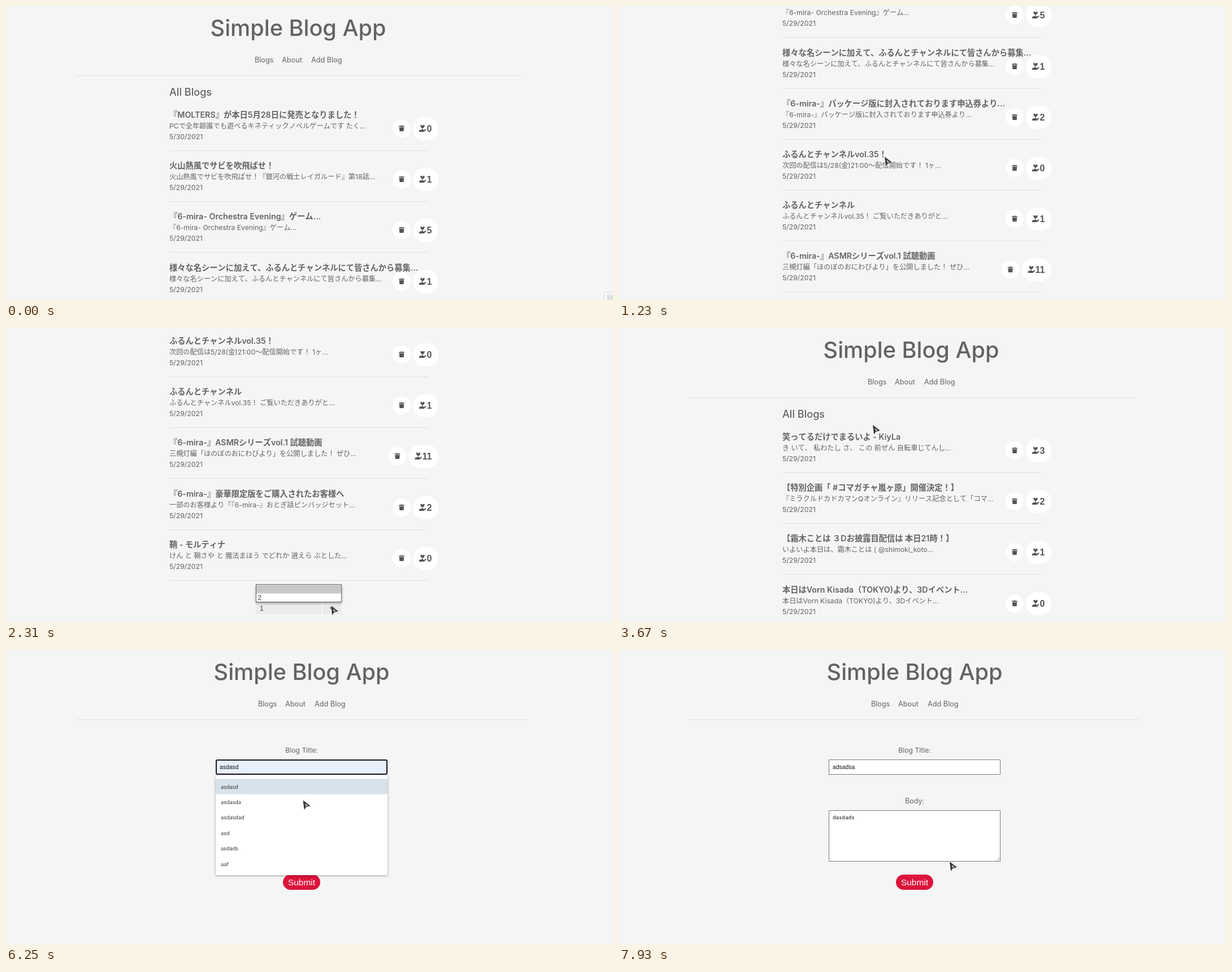
An HTML page with a canvas for the animation above (7990 ms loop, 1074x521 px).

```html
<!DOCTYPE html>
<html lang="ja">
<head>
<meta charset="utf-8">
<title>Simple Blog App</title>
<style>
html, body { margin: 0; width: 100%; height: 100%; overflow: hidden; background: #f5f5f5; }
canvas { display: block; width: 1074px; height: 521px; }
</style>
</head>
<body>
<canvas id="stage"></canvas>
<script>
const W = 1074, H = 521, LOOP = 7990, PITCH = 90.2;
const SANS = 'Inter, "Noto Sans CJK JP", "Noto Sans CJK", sans-serif';
const ARIAL = '"Liberation Sans", Arial, sans-serif';
const UI = '"Open Sans", "Noto Sans", sans-serif';
const MONO = '"DejaVu Sans Mono", monospace';
const INK = '#636363';

const canvas = document.getElementById('stage');
const dpr = window.devicePixelRatio || 1;
canvas.width = W * dpr;
canvas.height = H * dpr;
const c = canvas.getContext('2d');

// title, summary, likes
const PAGE1 = [
  ['『MOLTERS』が本日5月28日に発売となりました！', 'PCで全年齢誰でも遊べるキネティックノベルゲームです たく...', 0],
  ['火山熱風でサビを吹飛ばせ！', '火山熱風でサビを吹飛ばせ！『銀河の戦士レイガルード』第18話...', 1],
  ['『6-mira- Orchestra Evening』ゲーム...', '『6-mira- Orchestra Evening』ゲーム...', 5],
  ['様々な名シーンに加えて、ふるんとチャンネルにて皆さんから募集...', '様々な名シーンに加えて、ふるんとチャンネルにて皆さんから募集...', 1],
  ['『6-mira-』パッケージ版に封入されております申込券より...', '『6-mira-』パッケージ版に封入されております申込券より...', 2],
  ['ふるんとチャンネルvol.35！', '次回の配信は5/28(金)21:00～配信開始です！ 1ヶ...', 0],
  ['ふるんとチャンネル', 'ふるんとチャンネルvol.35！ ご覧いただきありがと...', 1],
  ['『6-mira-』ASMRシリーズvol.1 試聴動画', '三槻灯編「ほのぼのおにわびより」を公開しました！ ぜひ...', 11],
  ['『6-mira-』豪華限定版をご購入されたお客様へ', '一部のお客様より「『6-mira-』おとぎ話ピンバッジセット...', 2],
  ['鞘 - モルティナ', 'けん と 鞘さや と 魔法まほう でどれか 選えら ぶとした...', 0]
];
const PAGE2 = [
  ['笑ってるだけでまるいよ - KiyLa', 'き いて、 私わたし さ、 この 前ぜん 自転車じてんし...', 3],
  ['【特別企画「 #コマガチャ嵐ヶ原」開催決定！】', '『ミラクルドカドカマンQオンライン』リリース記念として「コマ...', 2],
  ['【霜木ことは ３Dお披露目配信は 本日21時！】', 'いよいよ本日は、霜木ことは ( @shimoki_koto...', 1],
  ['本日はVorn Kisada（TOKYO)より、3Dイベント...', '本日はVorn Kisada（TOKYO)より、3Dイベント...', 0]
];
const HINTS = ['asdasd', 'asdasda', 'asdasdad', 'asd', 'asdads', 'aaf'];

// time, x, y of the pointer tip
const POINTER = [
  [70, 1062, 508], [330, 840, 410], [600, 560, 300], [810, 470, 267],
  [1400, 470, 267], [1620, 472, 284], [1900, 530, 420], [2150, 575, 492],
  [2400, 575, 492], [2750, 500, 480], [3000, 470, 478], [3250, 468, 478],
  [3400, 462, 400], [3670, 449, 172], [3900, 450, 120], [4130, 455, 96],
  [4400, 468, 96], [4700, 530, 100], [4930, 578, 98], [5200, 556, 140],
  [5400, 542, 162], [5570, 542, 159], [5680, 566, 95], [5780, 590, 190],
  [5950, 590, 206], [6080, 560, 222], [6250, 525, 266], [6400, 600, 300],
  [6580, 708, 310], [6850, 872, 350], [7050, 872, 350], [7380, 560, 330],
  [7550, 566, 350], [7720, 574, 404], [7930, 585, 375]
];
const SCROLL = [[870, 0], [1040, 160], [1230, 380], [1420, 545], [1600, 621]];

// Smooth interpolation between keys, one value per column
function track(keys, t) {
  if (t <= keys[0][0]) return keys[0].slice(1);
  const i = keys.findIndex(k => k[0] > t);
  if (i < 0) return keys[keys.length - 1].slice(1);
  const a = keys[i - 1], b = keys[i];
  const u = (t - a[0]) / (b[0] - a[0]);
  return a.slice(1).map((v, n) => v + (b[n + 1] - v) * u);
}

function text(str, x, y, size, { weight = 400, family = SANS, color = INK, align = 'left' } = {}) {
  c.font = `${weight} ${size}px ${family}`;
  c.fillStyle = color;
  c.textAlign = align;
  c.fillText(str, x, y);
}

function box(x, y, w, h, color) {
  c.fillStyle = color;
  c.fillRect(x, y, w, h);
}

function pill(x, y, w, h, r, color) {
  c.fillStyle = color;
  c.beginPath();
  c.roundRect(x, y, w, h, r);
  c.fill();
}

function shape(points, color) {
  c.fillStyle = color;
  c.beginPath();
  points.forEach(([x, y]) => c.lineTo(x, y));
  c.closePath();
  c.fill();
}

function shadowed(blur, dy, draw) {
  c.save();
  c.shadowColor = 'rgba(0,0,0,.35)';
  c.shadowBlur = blur * dpr;
  c.shadowOffsetY = dy * dpr;
  draw();
  c.restore();
}

function trash(x, y) {
  const ink = '#555';
  pill(x - 5, y - 4.5, 10, 1.5, 0.5, ink);
  box(x - 1.8, y - 5.3, 3.6, 1.2, ink);
  shape([[x - 4.2, y - 2.3], [x + 4.2, y - 2.3], [x + 3.6, y + 5], [x - 3.6, y + 5]], ink);
}

function heartHand(x, y) {
  c.fillStyle = '#555';
  c.beginPath();
  c.moveTo(x, y);
  c.bezierCurveTo(x - 7, y - 5, x - 2.5, y - 9, x, y - 5);
  c.bezierCurveTo(x + 2.5, y - 9, x + 7, y - 5, x, y);
  c.fill();
  c.beginPath();
  c.moveTo(x - 6, y + 2.6);
  c.lineTo(x - 4, y + 2.4);
  c.quadraticCurveTo(x - 2, y + 0.4, x + 1.6, y + 1);
  c.quadraticCurveTo(x + 2.4, y + 2, x + 0.6, y + 2.6);
  c.lineTo(x + 2.5, y + 2.6);
  c.lineTo(x + 5.4, y + 0.6);
  c.quadraticCurveTo(x + 7.4, y + 1, x + 5.8, y + 2.6);
  c.lineTo(x + 2.6, y + 5.6);
  c.lineTo(x - 6, y + 5.6);
  c.fill();
}

function header(mid, left, right) {
  text('Simple Blog App', mid, 53, 39.6, { weight: 500, align: 'center' });
  text('Blogs', mid - 77, 99.5, 12.7);
  text('About', mid - 29, 99.5, 12.7);
  text('Add Blog', mid + 23, 99.5, 12.7);
  box(left, 123, right - left, 1, '#e0e0e0');
}

function entry([title, summary, likes], i) {
  const y = Math.round(i * PITCH), shift = likes > 9 ? 7.5 : 0;
  text(title, 289, y + 197.5, 14.25, { weight: 600 });
  text(summary, 289, y + 217.3, 12.2);
  text('5/' + (title.includes('5月28日') ? 30 : 29) + '/2021', 289, y + 236, 12.3);
  box(289, y + 256, 457, 1, '#e0e0e0');
  pill(684 - shift, y + 201, 32, 32, 16, '#fff');
  trash(700 - shift, y + 217);
  pill(720 - shift, y + 197, 45 + shift, 41, 20, '#fff');
  heartHand(737 - shift, y + 217.4);
  text(likes, 753.5, y + 222.8, 16, { weight: 700, family: ARIAL, color: '#555', align: 'right' });
}

function pager(t) {
  const open = t >= 2200 && t < 3130;
  box(442, 1107, 116, 21, '#ebebeb');
  box(561, 1107, 32, 21, '#ebebeb');
  text(t < 3130 ? '1' : '2', 449, 1121.5, 12, { family: ARIAL, color: '#444' });
  c.strokeStyle = '#555';
  c.lineWidth = 1.6;
  c.beginPath();
  c.moveTo(573, 1116);
  c.lineTo(577, 1120);
  c.lineTo(581, 1116);
  c.stroke();
  if (!open) return;
  shadowed(4, 2, () => box(442, 1076, 152, 31, '#fff'));
  const pick = t < 2720 ? 0 : 1;
  box(443, 1076.5 + pick * 15, 150, 15, '#c8c8c8');
  text(2 - pick, 445.5, pick ? 1088.5 : 1102.5, 12, { family: ARIAL, color: '#444' });
  c.strokeStyle = '#6a6a6a';
  c.lineWidth = 1;
  c.strokeRect(442.5, 1075.5, 151, 31);
}

function blogs(entries, t) {
  c.save();
  c.translate(0, -Math.round(entries === PAGE1 ? track(SCROLL, t)[0] : 0));
  header(517, 123, 912);
  text('All Blogs', 289, 159, 18.1, { weight: 500 });
  entries.forEach(entry);
  if (entries === PAGE1) pager(t);
  c.restore();
}

function field(y, h, focused, fill) {
  box(371, y, 304, h, fill);
  c.strokeStyle = focused ? '#14142a' : '#767676';
  c.lineWidth = focused ? 2 : 1;
  const d = focused ? 1 : 0.5;
  c.beginPath();
  c.roundRect(371 + d, y + d, 304 - 2 * d, h - 2 * d, focused ? 2 : 0);
  c.stroke();
}

const typed = (str, t, from, to) =>
  str.slice(0, Math.max(0, Math.floor((t - from) / (to - from) * str.length) + 1));

function form(t) {
  header(523, 124, 922);
  const listed = t >= 6020 && t < 6640;
  const [, py] = track(POINTER, t - 75);
  const row = Math.min(HINTS.length - 1, Math.floor((py - 228) / 27.4));
  const hovered = listed && row >= 0;

  text('Blog Title:', 523, 181.5, 12.2, { align: 'center' });
  field(194, 27, t >= 5960 && t < 7400, hovered ? '#e8f0fe' : '#fff');
  const value = hovered ? HINTS[row] : t >= 6700 ? typed('adsadsa', t, 6700, 7100) : '';
  text(value, 378, 211, 10.4, { family: ARIAL, color: '#111' });

  text('Body:', 523, 271.5, 12.5, { align: 'center' });
  field(284, 91, t >= 7400 && t < 7880, '#fff');
  text(t >= 7470 ? typed('dasdads', t, 7470, 7760) : '', 378, 299.5, 9.2, { family: MONO, color: '#111' });
  c.strokeStyle = '#888';
  c.lineWidth = 0.8;
  c.beginPath();
  for (const d of [3, 6]) {
    c.moveTo(673.5 - d, 373.5);
    c.lineTo(673.5, 373.5 - d);
  }
  c.stroke();

  pill(490, 398, 66, 27, 13.5, '#dc143c');
  text('Submit', 523, 416.7, 15.4, { family: ARIAL, color: '#fff', align: 'center' });

  if (listed) {
    shadowed(4, 1, () => pill(371, 222, 304, 177, 2, '#fff'));
    if (hovered) box(371, 228.4 + row * 27.4, 304, 27.2, '#d7e1ea');
    HINTS.forEach((h, i) => text(h, 380, 245.5 + i * 27.4, 9.4, { family: UI, color: '#222' }));
  }
}

function pointer(t) {
  const [x, y] = track(POINTER, t);
  c.save();
  c.translate(x, y);
  c.strokeStyle = 'rgba(255,255,255,.7)';
  c.lineWidth = 1.5;
  const arrow = [[0, 0], [2.2, 17], [5.6, 12], [13, 10]];
  c.beginPath();
  arrow.forEach(p => c.lineTo(...p));
  c.closePath();
  c.stroke();
  shape(arrow, '#34343a');
  shape([[3.6, 5.5], [4.8, 11], [9, 9.4]], '#bdbdbd');
  c.restore();
}

function cornerTip() {
  box(1058, 507, 16, 14, '#f8f8f8');
  c.strokeStyle = '#dcdcdc';
  c.lineWidth = 1;
  c.strokeRect(1058.5, 507.5, 20, 20);
  text('録', 1063, 521, 11, { color: '#c4c4c4' });
}

function draw(t) {
  c.setTransform(dpr, 0, 0, dpr, 0, 0);
  box(0, 0, W, H, '#f5f5f5');
  if (t < 3300) blogs(PAGE1, t);
  else if (t < 5700) blogs(PAGE2, t);
  else form(t);
  if (t < 70) cornerTip();
  else pointer(t);
}

const start = performance.now();
function tick() {
  draw((performance.now() - start) % LOOP);
  requestAnimationFrame(tick);
}
tick();
</script>
</body>
</html>
```
